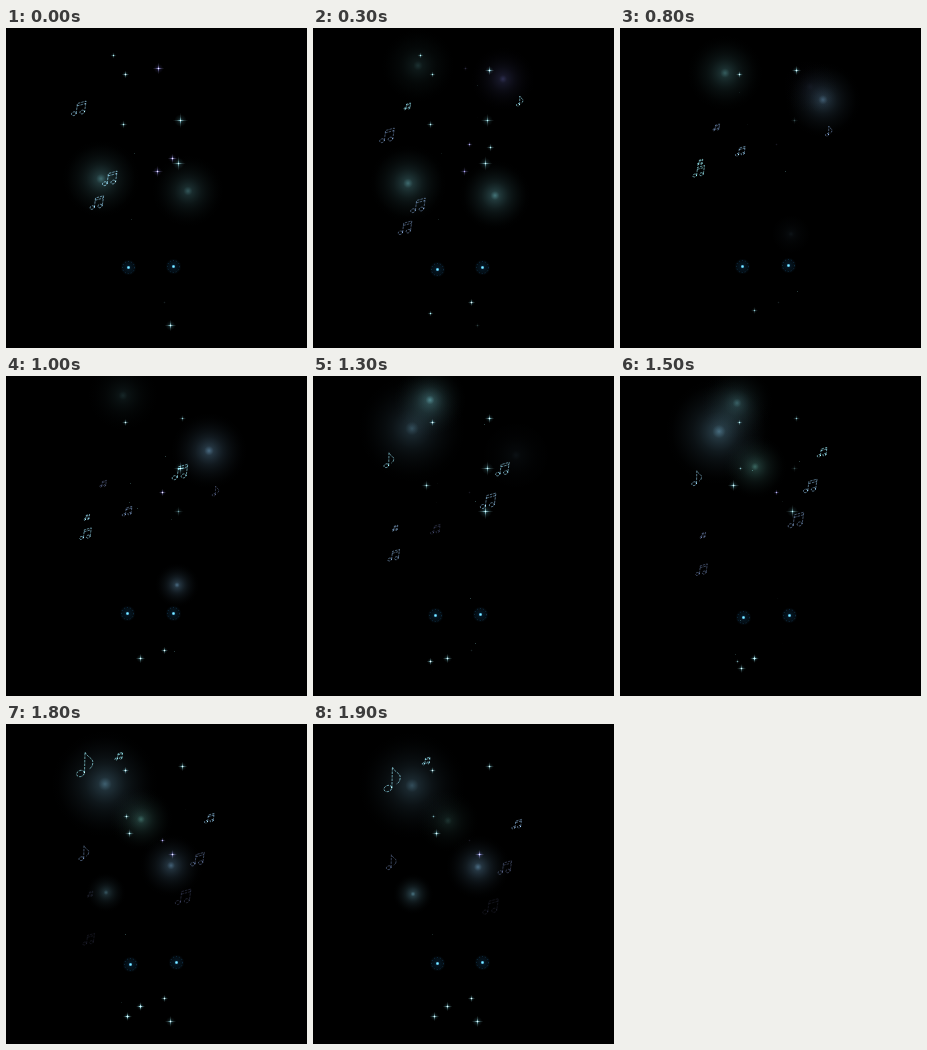
Animation of 301x320 px, one loop 2 s. Source, as an HTML page with a canvas:

```html
<!DOCTYPE html>
<html lang="en">
<head>
<meta charset="utf-8">
<title>Sparkles and notes</title>
<style>
  html, body { margin: 0; width: 100%; height: 100%; overflow: hidden; background: #000; }
  canvas { display: block; width: 301px; height: 320px; }
</style>
</head>
<body>
<canvas id="stage" width="301" height="320"></canvas>
<script>
const ctx = document.getElementById('stage').getContext('2d');
const STEPS = 20, STEP_MS = 100, NOTE_LIFE = 11;

// Emitters: x, y, step of first sparkle, size, steps between sparkles
const emitters = [
  [119, 46, 0, 4, 4.5], [176, 42, 3, 5, 5], [152, 40, 0, 6], [107, 27, 1.5, 4],
  [117, 96, 1.5, 5], [113, 109, 14.5, 6], [123, 109, 19, 5], [120, 92, 17, 4],
  [174, 92, 1, 8, 10.5], [172, 135, 1.5, 8, 11.5], [151, 143, 1, 6], [166, 130, 0, 5, 19],
  [177, 119, 4.5, 5], [156, 116, 4.5, 4, 6], [117, 285, 4.5, 4, 8.5],
  [134, 282, 10, 5, 3], [158, 274, 2.5, 4, 8], [164, 297, 0, 6, 19], [121, 292, 16, 5, 3]
];

// Glows: x, y, brightest step, radius, hue
const glows = [
  [95, 153, 1.5, 39, 185], [182, 166, 2, 36, 185], [105, 42, 6, 38, 182],
  [190, 54, 5, 32, 238], [203, 74, 9.5, 38, 205], [117, 24, 13, 36, 185],
  [99, 57, 16, 54, 200], [135, 93, 16.5, 32, 172], [165, 143, 19, 32, 205],
  [100, 170, 19, 20, 195], [171, 209, 10, 22, 205]
];

// Notes: x, y, first step, size; large notes fall faster
const pairs = [
  [72, 53, -3, 15], [103, 123, -3, 15], [90, 149, -3, 14], [94, 74, 2, 7],
  [119, 99, 4, 10], [79, 143, 8, 12], [80, 134, 8, 6], [174, 86, 9, 16],
  [189, 76, 11, 14], [202, 70, 14, 10], [113, 32, 18, 8]
];
const singles = [[206, 67, 2, 10], [75, 75, 12, 15], [78, 40, 18, 25]];

function seededRandom(seed) {
  return () => (seed = seed * 16807 % 2147483647) / 2147483647;
}

const hsla = (hue, saturation, lightness, alpha) =>
  `hsla(${hue},${saturation}%,${lightness}%,${alpha})`;

// Rises from 0 to 1 at the peak and falls again
const swell = (step, peak, half) => Math.max(0, 1 - ((step - peak) / half) ** 2);

function fade(gradient, hue, saturation, lightness, alphas) {
  alphas.forEach((alpha, i) => gradient.addColorStop(
    i / (alphas.length - 1), hsla(hue, saturation, lightness, alpha)));
  return gradient;
}

function disc(x, y, radius, hue, saturation, lightness, alphas) {
  const gradient = ctx.createRadialGradient(x, y, 0, x, y, radius);
  ctx.fillStyle = fade(gradient, hue, saturation, lightness, alphas);
  ctx.fillRect(x - radius, y - radius, radius * 2, radius * 2);
}

function arm(x, y, dx, dy, hue, alpha) {
  const gradient = ctx.createLinearGradient(x - dx, y - dy, x + dx, y + dy);
  ctx.strokeStyle = fade(gradient, hue, 40, 72, [0, alpha * .3, alpha, alpha * .3, 0]);
  ctx.lineWidth = 1;
  ctx.beginPath();
  ctx.moveTo(x - dx, y - dy);
  ctx.lineTo(x + dx, y + dy);
  ctx.stroke();
}

function drawSparkle(x, y, size, power, hue) {
  const reach = size * (.4 + .6 * power);
  disc(x, y, reach * .8, hue, 40, 55, [power * .45, power * .12, 0]);
  arm(x, y, reach, 0, hue, power * .75);
  arm(x, y, 0, reach, hue, power * .75);
}

function drawEmitter([x, y, first, size, interval = STEPS], step) {
  const inner = x > 145 && x < 170 && y < 200;
  for (let peak = first; peak < STEPS; peak += interval) {
    const power = swell(step, peak, 1.3 + size * .33);
    if (power) drawSparkle(x + .5, y + .5, size, power, inner ? 245 : 188);
  }
}

// Faint specks scattered around the two columns
function drawDust(step) {
  const random = seededRandom(71);
  for (let i = 0; i < 24; i++) {
    const x = (i % 2 ? 122 : 168) + (random() - .5) * 22;
    const y = 35 + random() * 110 + (i % 3 ? 0 : 150);
    const power = swell(step, random() * STEPS, 2.2);
    ctx.fillStyle = hsla(180, 25, 55, power * .4);
    ctx.fillRect(Math.round(x), Math.round(y), 1, 1);
  }
}

function drawGlow([x, y, peak, radius, hue], step) {
  const power = swell(step, peak, radius / 10);
  const alphas = [.85, .42, .3, .2, .13, .08, .04, .01, 0].map(alpha => alpha * power);
  if (power) disc(x, y + 1.5 * (step - peak), radius, hue, 28, 47, alphas);
}

function traceHead(x, y) {
  ctx.moveTo(x + .15, y);
  ctx.ellipse(x, y, .16, .12, -.4, 0, Math.PI * 2);
}

function traceLine(...points) {
  points.forEach(([x, y], i) => i ? ctx.lineTo(x, y) : ctx.moveTo(x, y));
}

function tracePair() {
  traceHead(-.36, .38);
  traceHead(.2, .27);
  traceLine([-.2, .36], [-.12, -.3], [.46, -.46], [.36, .25]);
  traceLine([-.14, -.14], [.44, -.3]);
}

function traceSingle() {
  traceHead(-.14, .38);
  traceLine([.02, .36], [.04, -.48]);
  ctx.bezierCurveTo(.12, -.25, .42, -.25, .34, .02);
  ctx.quadraticCurveTo(.32, .14, .2, .2);
}

// Notes fall while turning from pale teal to violet
function drawNote([x, y, first, size], trace, step) {
  const age = step - first, k = age / NOTE_LIFE;
  if (k < 0 || k >= 1) return;
  ctx.save();
  ctx.translate(x + .4 * age, y + .6 * size * age);
  ctx.scale(size, size);
  ctx.lineWidth = .9 / size;
  ctx.setLineDash([2.5 / size, 1 / size]);
  ctx.strokeStyle = hsla(185 + 55 * k, 50, 68, .75 * (1 - k * k));
  ctx.beginPath();
  trace();
  ctx.stroke();
  ctx.restore();
}

function drawLamp(x, y) {
  disc(x, y, 8, 205, 75, 30, [.4, .22, .15, 0]);
  ctx.strokeStyle = hsla(205, 70, 30, .35);
  ctx.lineWidth = 1;
  ctx.setLineDash([1, 2]);
  ctx.beginPath();
  ctx.arc(x, y, 6, 0, Math.PI * 2);
  ctx.stroke();
  ctx.setLineDash([]);
  disc(x, y, 2, 195, 95, 72, [1, .7, 0]);
}

function draw(step) {
  ctx.globalCompositeOperation = 'source-over';
  ctx.fillStyle = '#000';
  ctx.fillRect(0, 0, 301, 320);
  ctx.globalCompositeOperation = 'lighter';
  glows.forEach(glow => drawGlow(glow, step));
  drawDust(step);
  emitters.forEach(emitter => drawEmitter(emitter, step));
  pairs.forEach(note => drawNote(note, tracePair, step));
  singles.forEach(note => drawNote(note, traceSingle, step));
  const wave = lag => Math.cos((step - lag) / 13 * Math.PI * 2);
  drawLamp(Math.round(122.5 + 1.4 * wave(4.5)) + .5, Math.round(239 + 1.8 * wave(3)) + .5);
  drawLamp(Math.round(168 + 1.6 * wave(4.5)) + .5, Math.round(238 + .8 * wave(3)) + .5);
}

const start = performance.now();
function tick() {
  draw(Math.floor((performance.now() - start) / STEP_MS) % STEPS);
  requestAnimationFrame(tick);
}
tick();
</script>
</body>
</html>
```
